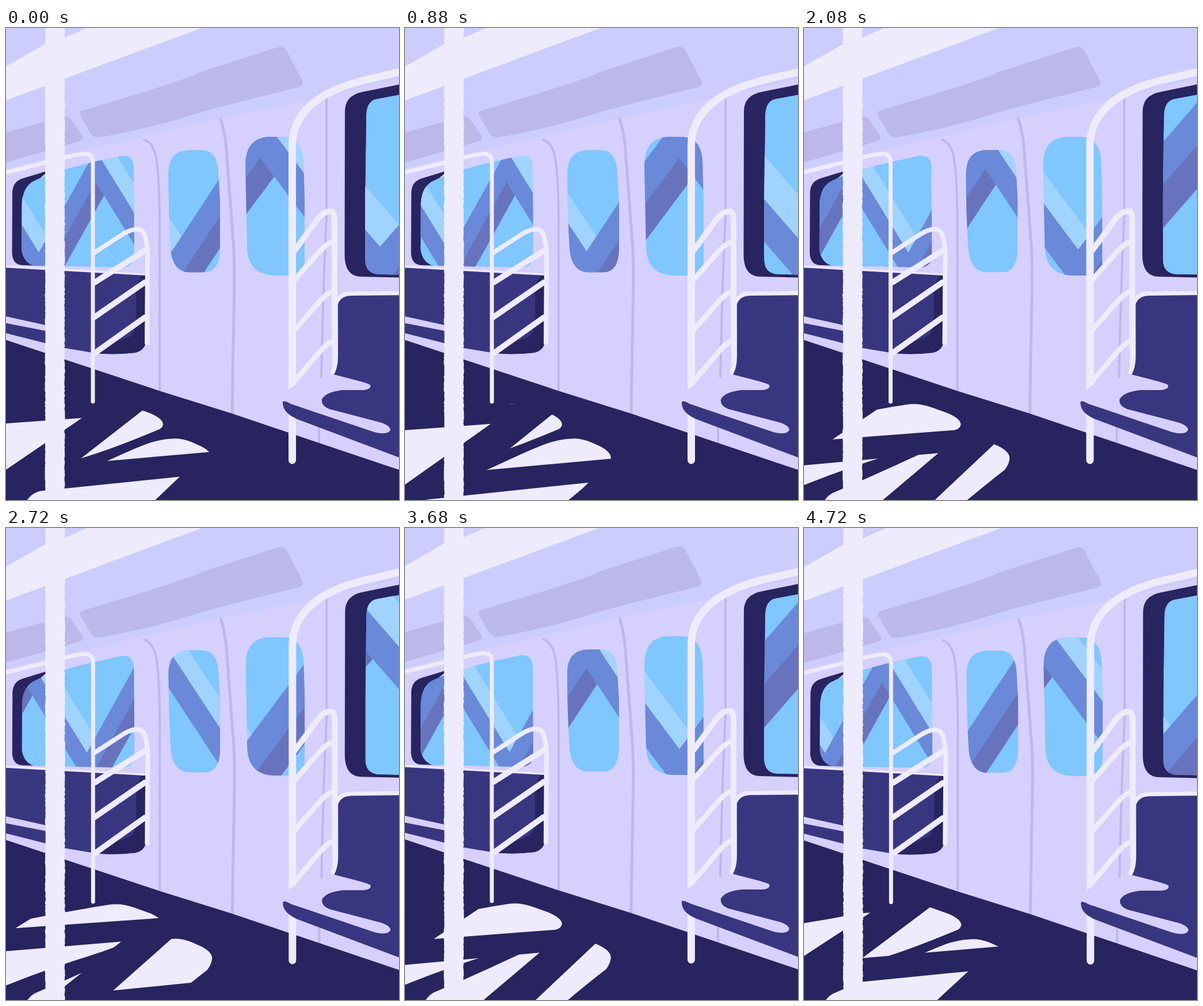
An HTML page for the animation above (4.8 s loop, 683 by 820 pixels).

```html
<!DOCTYPE html>
<html lang="en">
<head>
<meta charset="utf-8">
<title>Train ride</title>
<style>
  html, body { margin: 0; width: 100%; height: 100%; overflow: hidden; background: #d6d0fe; }
  svg { display: block; width: 683px; height: 820px; }
  .wall { fill: #d6d0fe; }
  .ceil { fill: #ccccff; }
  .pale { fill: #eeebfc; }
  .vent { fill: #bcb9ea; }
  .navy { fill: #28245f; }
  .seat { fill: #393680; }
  .sky { fill: #80c6ff; }
  .mid { fill: #6a89d9; }
  .dark { fill: #6774bd; }
  .light { fill: #a1d3ff; }
  .seam, .rail { fill: none; stroke-linecap: round; stroke-linejoin: round; }
  .seam { stroke: #bcb9ea; stroke-width: 4; }
  .rail { stroke: #eeebfc; }
</style>
</head>
<body>
<svg viewBox="0 0 683 820">
  <defs>
    <clipPath id="floorClip">
      <path d="M-9 687L45 678Q150 658 185 653.500Q202 652 222 659L250 669Q273 679 273 689Q272 696 262 699Q190 729 145 743Q70 766 -9 798Z"/>
      <path d="M30 830Q40 813 50 808Q110 783 170 755Q230 727 252 720Q280 712 300 713.500Q315 715 333 724Q357 734 358 747Q357 758 349 768Q320 790 270 832Z"/>
    </clipPath>
  </defs>
  <g id="scene">
    <path class="wall" d="M-9-9H699V830H-9Z"/>
    <path class="ceil" d="M-9-9H699V84L540 122L375 156L157 207L-9 246Z"/>
    <path class="pale" d="M-9 72L68 28L102 17L160-9H364L340 0L102 88L-9 129Z"/>
    <path class="vent" d="M134 143Q320 88 340 76L470 34Q481 30 487 38L515 92Q519 99 508 103Q350 142 330 149Q250 175 162 190Q152 191 146 182L129 152Q125 146 134 143Z"/>
    <path class="vent" d="M-9 184L92 156Q107 151 113 158L132 186Q137 194 127 197L-9 236Z"/>

    <path class="seam" d="M240 194Q258 200 262 232Q267 270 267 350V630"/>
    <path class="seam" style="stroke-width:5" d="M373 158Q382 185 384 225L396 385Q398 430 395 540L393 671"/>
    <path class="seam" d="M557 121V330Q552 420 548 607M544 690V722"/>

    <path class="navy" d="M76 247L30 261Q12 266 11 285L10.500 392Q12 411 28 412L60 413V260Z"/>
    <g id="wins"></g>
    <path class="rail" style="stroke-width:3" d="M-2 414L240 428"/>
    <path class="seat" d="M-9 416L243 430V545Q241 560 225 564Q180 569 150 564L102 556L-9 528Z"/>
    <path class="navy" d="M243 430V545Q241 560 225 564Q190 568 160 565Q150 560 175 551L215 536Q226 530 226 500V457Q230 435 236 430Z"/>
    <path class="wall" d="M-9 499L68 516L96 527L68 526L-9 511Z"/>

    <path class="navy" d="M-9 539L267 630.500L392 669.500L500 706L699 773V830H-9Z"/>
    <path id="beams" class="pale" clip-path="url(#floorClip)"/>

    <g class="rail" style="stroke-width:8">
      <path d="M-9 253L68 234Q120 219 138 218.500Q151 219 151 234V649" style="stroke-width:7"/>
      <path d="M154 390L205 357Q239 338 243 368Q247 385 246 405L245 547"/>
      <path d="M154 442L241 387M154 502L241 442M154 565L241 503" style="stroke-width:10"/>
    </g>

    <g class="rail">
      <path style="stroke-width:13" d="M699 73L625 90Q560 106 530 134Q497.500 163 497.500 205V751"/>
      <path style="stroke-width:10" d="M502 386L535 341Q552 315 567 319Q572 322 571 345V500L572 570Q573 590 569 598"/>
      <path style="stroke-width:9" d="M502 437L545 388Q560 372 569 372M502 524L548 472Q560 459 569 458M502 613L550 557Q560 546 569 544"/>
      <path style="stroke-width:7" d="M577 474Q581 462 597 461.500L699 460"/>
    </g>
    <path class="wall" d="M490 629L506 618L569 602L600 610L570 668L482 651Z"/>
    <path class="seat" d="M577 480Q581 466 600 465L699 464V752L505 679Q480 668 481 650Q482 646 495 653L640 702Q664 708 668 698Q667 690 650 685L562 662Q547 656 549 645Q556 632 585 629L622 629Q636 627 633 620Q628 617 605 611L570 602Q577 590 577 570Z"/>
    <path id="pole" class="pale"/>
  </g>
</svg>
<script>
const NS = 'http://www.w3.org/2000/svg';
const STEP = 80, LOOP = 60, CYCLE = 10;
const $ = id => document.getElementById(id);

function add(parent, tag, attrs) {
  const el = document.createElementNS(NS, tag);
  for (const k in attrs) el.setAttribute(k, attrs[k]);
  return parent.appendChild(el);
}
const poly = pts => 'M' + pts.map(p => p[0].toFixed(1) + ' ' + p[1].toFixed(1)).join('L') + 'Z';

// x, y: a valley of the zigzag at time zero; down, up: slopes of its sides;
// mid, dark, light: vertical thickness
const wins = [
  { x: 57, y: 390, wave: 208, down: 1.63, up: 1.8, mid: 55, dark: 50, light: 50,
    glass: 'M27 385L27.500 305Q29 273 52 264Q80 250 150 233L195 223Q220 217 222 240L223 396Q222 416 200 416L48 413Q30 407 27 385Z' },
  { x: 288, y: 388, wave: 276, down: 1.52, up: 1.52, mid: 66, dark: 56, light: 52,
    glass: 'M282 255Q281 213 318 212H338Q366 211 369 247L372 300V385Q371 424 345 424.500H320Q290 425 286 385Q282 320 282 255Z' },
  { x: 267, y: 385, wave: 350, down: 1.34, up: 1.34, mid: 75, dark: 65, light: 54,
    glass: 'M416 238Q416 192 455 189H480Q514 189 517 230L519 300V408Q518 430 492 430H465Q422 428 419 385Z' },
  { x: 650, y: 380, wave: 460, down: 1.15, up: 1.15, mid: 74, dark: 76, light: 76,
    frame: 'M699 95L620 111Q589 117 589 145L588.500 395Q589 432 618 432L699 434Z',
    glass: 'M699 113L645 123Q627 126 626 150L624 300V403Q625 427 648 428L699 429Z' }
];

wins.forEach((w, i) => {
  if (w.frame) add($('wins'), 'path', { d: w.frame, class: 'navy' });
  add(add(document.querySelector('defs'), 'clipPath', { id: 'win' + i }), 'path', { d: w.glass });
  const g = add($('wins'), 'g', { 'clip-path': `url(#win${i})` });
  add(g, 'path', { d: w.glass, class: 'sky' });
  w.paths = ['dark', 'light', 'mid'].map(c => add(g, 'path', { class: c }));
});

function drawZigzag(w, phase) {
  const inv = 1 / w.down + 1 / w.up, rise = w.wave / inv;
  const top = w.y - rise, low = w.y + w.mid, inner = top + w.mid;
  // corner offsets where a stripe meets the next side
  const dx = w.dark / (w.down + w.up), dy = dx * w.down;
  const lx = w.light / (w.down + w.up), ly = lx * w.up;
  let dark = '', light = '', mid = '';
  for (let k = -2; k <= 3; k++) {
    const x = w.x + (phase + k) * w.wave, l = x - rise / w.down, r = x + rise / w.up;
    dark += poly([[x, low - 1], [r, inner - 1], [r + dx, inner + dy], [x + dx, low + dy]]);
    light += poly([[l, top + 1], [x, w.y + 1], [x + lx, w.y - ly], [l + lx, top - ly]]);
    mid += poly([[l, top], [x, w.y], [r, top], [r, inner], [x, low], [l, inner]]);
  }
  [dark, light, mid].forEach((d, i) => w.paths[i].setAttribute('d', d));
}

// A wedge of sunlight opening to one side of its tip
function wedge(x, y, dir, flat, steep) {
  const f = flat + x * 0.00018, s = steep + x * 0.0016, far = 900 * dir;
  return poly([[x, y], [x + far, y - far * f], [x + far, y - far * s]]);
}

function drawBeams(phase) {
  let d = '';
  for (let k = -2; k <= 1; k++) {
    const dx = (phase + k) * 170, x = 118 + dx;
    const y = 695 + 0.605 * (x - 16) + 0.00038 * (x - 16) * (x - 102);
    d += wedge(x, y, 1, 0.067, 0.59);
    d += wedge(132 + dx, 677.5 + dx * 0.6, -1, 0.048, 0.47);
  }
  $('beams').setAttribute('d', d);
}

function drawPole() {
  let seed = 7;
  const rough = () => ((seed = seed * 16807 % 2147483647) / 2147483647 - 0.5) * 1.4;
  const left = [], right = [];
  for (let y = -9; y < 832; y += 3) {
    left.push([68 + rough(), y]);
    right.unshift([102 + rough(), y]);
  }
  $('pole').setAttribute('d', poly(left.concat(right)));
}

// Carriage sway: step, x, y
const sway = [[0, 0, 0], [11, 0, 0], [17, -0.8, -0.9], [26, -0.5, -0.1], [34, 0.3, 0.2],
  [46, -0.1, -0.9], [59, 0.3, 0.9], [60, 0, 0]];

function swayAt(n) {
  const i = sway.findIndex(s => s[0] > n), a = sway[i - 1], b = sway[i];
  const f = (n - a[0]) / (b[0] - a[0]);
  return [1, 2].map(j => a[j] + (b[j] - a[j]) * f);
}

let last = -1;
function render(now) {
  const n = Math.floor((now - start) / STEP) % LOOP;
  if (n !== last && n >= 0) {
    last = n;
    const phase = n % CYCLE / CYCLE;
    wins.forEach(w => drawZigzag(w, phase));
    drawBeams(phase);
    $('scene').setAttribute('transform', `translate(${swayAt(n)})`);
  }
  requestAnimationFrame(render);
}

drawPole();
const start = performance.now();
render(start);
</script>
</body>
</html>
```
